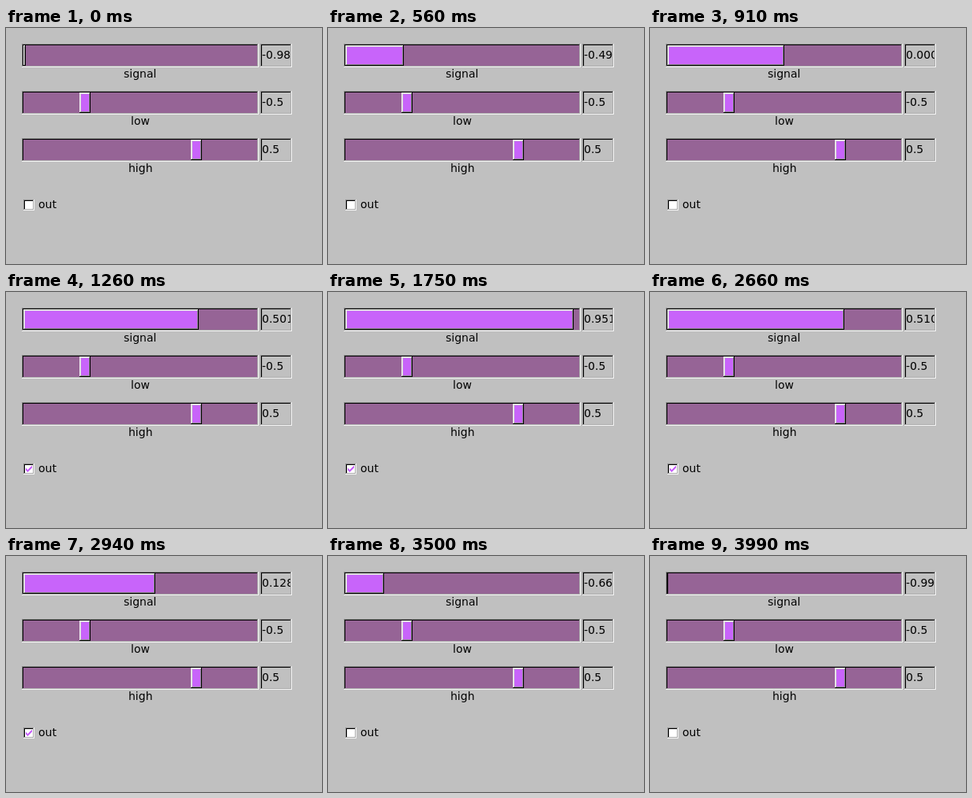
An HTML page with a canvas for the animation above (4060 ms loop, 400 by 300 pixels).

```html
<!DOCTYPE html>
<html lang="en">
<head>
<meta charset="utf-8">
<title>Hysteresis</title>
<style>
  html, body { margin: 0; width: 100%; height: 100%; overflow: hidden; background: #c0c0c0; }
  canvas { display: block; }
</style>
</head>
<body>
<canvas id="stage" width="400" height="300"></canvas>
<script>
const ctx = document.getElementById('stage').getContext('2d');
const STEP = 70, STEPS = 58;
const BACK = '#c0c0c0', TROUGH = '#966496', ACCENT = '#c864fa';
const GRAYS = { A: '#000', M: '#8a8a8a', P: '#ababab', T: '#d5d5d5', W: '#f5f5f5' };
const UP = 'AAWWMMTT', DOWN = 'WWMMPPAA';

// Phase of the sine in degrees, as [step, angle]
const PHASE = [[0, -78.6], [8, -29.97], [18, 30.07], [33, 120.1], [42, 172.62], [48, 210.1], [57, 263.4]];

function phaseAt(step) {
  const i = PHASE.findIndex(([s], k) => k > 0 && step <= s);
  const [s0, a0] = PHASE[i - 1], [s1, a1] = PHASE[i];
  return a0 + (a1 - a0) * (step - s0) / (s1 - s0);
}

function rect(x, y, w, h, color) {
  ctx.fillStyle = color;
  ctx.fillRect(x, y, w, h);
}

// Bevelled box: edges go bottom, right, top, left, from the outside in
function box(x, y, w, h, bevel, color) {
  if (w <= 0 || h <= 0) return;
  rect(x, y, w, h, color);
  for (let i = 0; i < bevel.length; i += 4) {
    const [bottom, right, top, left] = [...bevel.slice(i, i + 4)].map(c => GRAYS[c]);
    rect(x, y + h - 1, w, 1, bottom);
    if (--h <= 0) return;
    rect(x + w - 1, y, 1, h, right);
    if (--w <= 0) return;
    rect(x, y, w, 1, top);
    y++;
    if (--h <= 0) return;
    rect(x, y, 1, h, left);
    x++;
    if (--w <= 0) return;
  }
}

function text(str, x, y) {
  ctx.fillStyle = '#000';
  ctx.fillText(str, x, y);
}

function slider(y, label, value, shown, filled) {
  const inner = 296, knob = 14, part = (value + 1) / 2;
  box(20, y, 300, 30, DOWN, TROUGH);
  if (filled) box(22, y + 2, Math.round(part * inner), 26, UP, ACCENT);
  else box(22 + Math.round(part * (inner - knob)), y + 2, knob, 26, UP, ACCENT);
  text(label, Math.round(170 - ctx.measureText(label).width / 2), y + 43);

  box(322, y, 40, 30, DOWN, BACK);
  ctx.save();
  ctx.beginPath();
  ctx.rect(324, y + 2, 36, 26);
  ctx.clip();
  text(shown, 324, y + 19);
  ctx.restore();
}

function checkbox(label, checked) {
  box(22, 218, 14, 14, DOWN, '#fff');
  if (checked) {
    for (let i = 0; i < 8; i++) rect(25 + i, 224 + (i <= 2 ? i : 4 - i), 1, 3, ACCENT);
  }
  text(label, 41, 229);
}

function draw() {
  const step = Math.floor(performance.now() / STEP) % STEPS;
  const angle = phaseAt(step);
  const signal = Math.sin(angle * Math.PI / 180);
  ctx.font = '14px "DejaVu Sans", sans-serif';
  rect(0, 0, 400, 300, BACK);
  slider(20, 'signal', signal, signal.toFixed(6), true);
  slider(80, 'low', -0.5, '-0.5', false);
  slider(140, 'high', 0.5, '0.5', false);
  // On once the signal rises past high, off once it falls past low
  checkbox('out', angle > 30 && angle < 210);
  requestAnimationFrame(draw);
}
draw();
</script>
</body>
</html>
```
